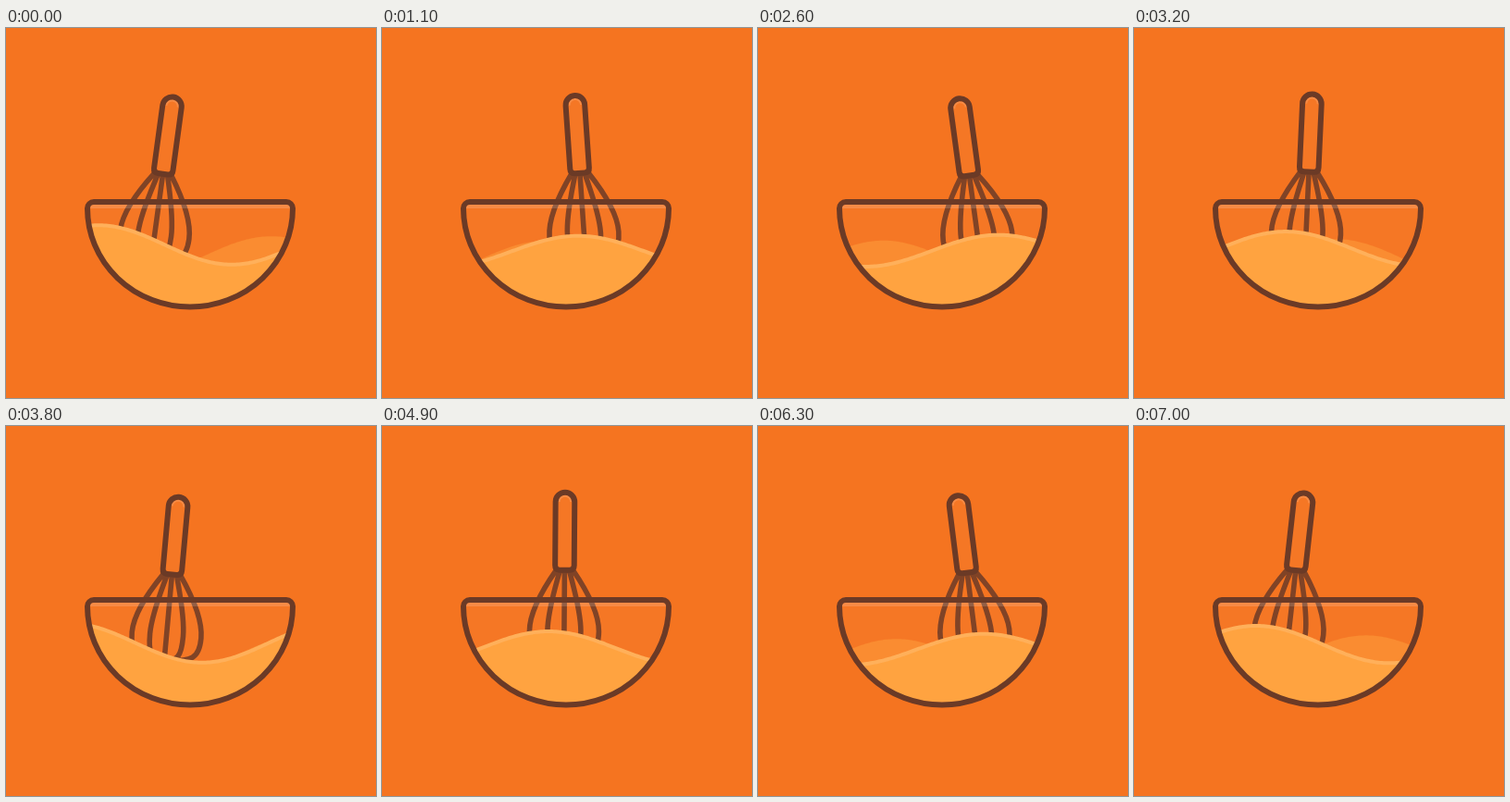
Write an HTML page with a canvas that moves like this. It is 400x400 px and loops after 7.1 s.

```html
<!DOCTYPE html>
<html lang="en">
<head>
<meta charset="utf-8">
<title>Whisk and bowl</title>
<style>
html, body { margin: 0; width: 100%; height: 100%; overflow: hidden; background: #f57420; }
canvas { display: block; }
</style>
</head>
<body>
<canvas id="stage" width="400" height="400"></canvas>
<script>
const ctx = document.getElementById('stage').getContext('2d');
const LOOP = 7100, STEP = 100, CYCLE = 1800, WAVELENGTH = 288;
const BROWN = '#6b3a26', WIRE = '#804326';
const TINT = 'rgba(255,255,255,.025)', SHINE = 'rgba(255,255,255,.15)';
const { sin, cos, PI } = Math;

const bowl = new Path2D('M95 188H303a7 7 0 0 1 7 7A111 106.5 0 0 1 88 195a7 7 0 0 1 7-7Z');
const handle = new Path2D('M-10.3 10.3a10.3 10.3 0 0 1 20.6 0V79q0 5-5 5H-5.3q-5 0-5-5Z');
const handleShine = new Path2D('M-6.3 10.3a6.3 6.3 0 0 1 12.6 0');
const wires = new Path2D('M0 84V178');
for (const side of [-1, 1]) {
  for (const [top, mid, belly] of [[9, 20, 37.5], [5, 9, 18]]) {
    const x = v => v * side;
    wires.addPath(new Path2D(
      `M${x(top)} 84C${x(mid)} 100 ${x(belly)} 128 ${x(belly)} 150S${x(belly * .8)} 176 0 178`));
  }
}

function stroke(path, color, width) {
  ctx.strokeStyle = color;
  ctx.lineWidth = width;
  ctx.stroke(path);
}

function fill(path, color) {
  ctx.fillStyle = color;
  ctx.fill(path);
}

function wave(crestX, crestY, amplitude, color, line) {
  const surface = new Path2D();
  for (let x = 80; x <= 320; x += 2) {
    surface.lineTo(x, crestY + amplitude * (1 - cos((x - crestX) / WAVELENGTH * 2 * PI)));
  }
  const body = new Path2D(surface);
  body.lineTo(320, 310);
  body.lineTo(80, 310);
  fill(body, color);
  if (line) stroke(surface, line, 4);
}

function inBowl(paint) {
  ctx.save();
  ctx.clip(bowl);
  paint();
  ctx.restore();
}

function whisk(angle) {
  const swing = angle + .24;
  const sway = -.963 * cos(swing) - .08 * sin(2 * swing);
  ctx.save();
  ctx.translate(199 + 18.6 * sway, 74.9 + 3.3 * sin(angle - .1));
  ctx.rotate(-.139 * sway);
  stroke(wires, WIRE, 5.6);
  fill(handle, TINT);
  stroke(handleShine, SHINE, 2);
  stroke(handle, BROWN, 6);
  ctx.restore();
}

function draw(t) {
  const angle = t / CYCLE * 2 * PI;
  const drift = WAVELENGTH * t / CYCLE;
  const swell = cos(angle - .35);

  ctx.fillStyle = '#f57420';
  ctx.fillRect(0, 0, 400, 400);
  fill(bowl, TINT);

  inBowl(() => wave(290 + drift + 8 * cos(angle - 2), 227.7 - 2.7 * swell, 21, '#fa8c31'));
  whisk(angle);
  inBowl(() => {
    const amplitude = 19 + 2.4 * swell;
    const trough = 257 - 1.3 * swell;
    wave(388 - drift, trough - 2 * amplitude, amplitude, '#ffa340', '#ffb05a');
    stroke(new Path2D('M90 193H308'), SHINE, 4);
  });
  stroke(bowl, BROWN, 6);
}

function tick() {
  draw(Math.floor(performance.now() % LOOP / STEP) * STEP);
  requestAnimationFrame(tick);
}
ctx.lineJoin = 'round';
tick();
</script>
</body>
</html>
```
